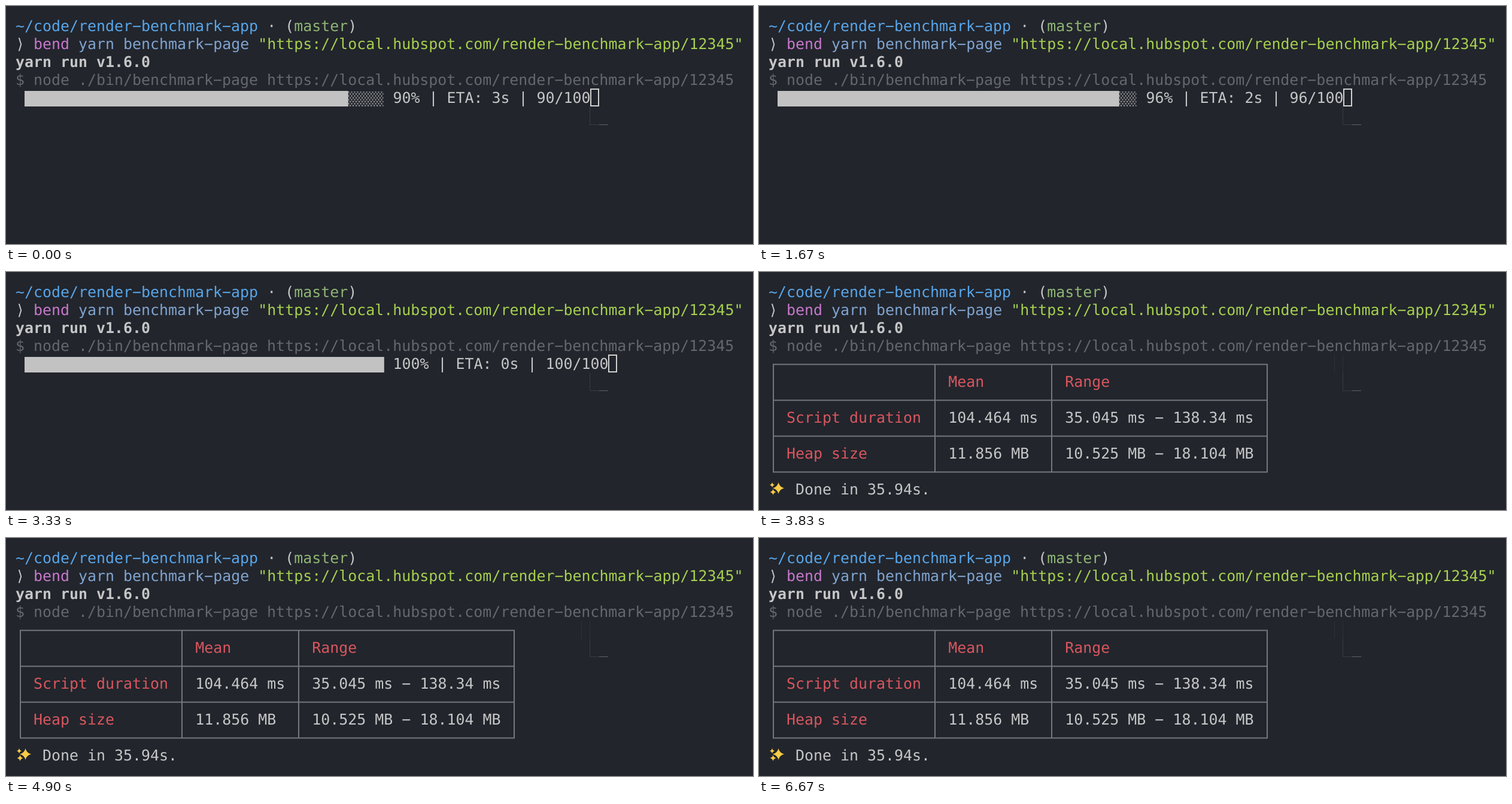
An HTML page for the animation above (6.71 s loop, 1248 by 398 pixels).

```html
<!DOCTYPE html>
<html lang="en">
<head>
<meta charset="utf-8">
<title>Benchmark terminal</title>
<style>
html, body { margin: 0; width: 100%; height: 100%; overflow: hidden; background: #22252c; }
svg { display: block; width: 1248px; height: 398px; }
text {
  font: 24.93px "DejaVu Sans Mono", "Liberation Mono", monospace;
  text-rendering: geometricPrecision;
  white-space: pre;
}
</style>
</head>
<body>
<svg id="stage" viewBox="0 0 1248 398">
  <defs>
    <pattern id="shade" x="31.3" y="142.5" width="5" height="6.5" patternUnits="userSpaceOnUse">
      <path d="M0.3 0.4h2v2h-2zM2.8 3.65h2v2h-2z" fill="#c2c2c2"/>
    </pattern>
  </defs>
  <rect width="1248" height="398" fill="#22252c"/>
  <g id="head"></g>
  <g id="trace" fill="none">
    <path id="smear" d="M961.5 139V168M975.5 139V168" stroke="#2d3037"/>
    <path d="M975.5 168V198.5H991" stroke="#383b42"/>
    <path d="M991 198.5H1006" stroke="#5f6268"/>
  </g>
  <g id="progress">
    <rect id="rest" y="143" height="25" fill="url(#shade)"/>
    <rect id="bar" x="31" y="142" height="26" fill="#c2c2c2"/>
    <text id="status" y="162" fill="#c5c6c6"></text>
    <rect id="cursor" y="139" width="13" height="28" fill="none" stroke="#d0d0d0" stroke-width="2"/>
  </g>
  <g id="report">
    <path id="grid" fill="none" stroke="#74777d" stroke-width="2"/>
    <path id="sparkles" fill="#f6cb45"/>
  </g>
</svg>
<script>
const LOOP = 6710, CELL = 15.01, LEFT = 16;
const STEP = 285, LEAD = 280, REPORT_AT = 3400;
const BAR_CELLS = 40;
const plain = "#c5c6c6", red = "#d9565f", dim = "#65676c";

const $ = id => document.getElementById(id);
const colX = col => LEFT + col * CELL;
const set = (el, attrs) => {
  for (const key in attrs) el.setAttribute(key, attrs[key]);
};
// The terminal face has wide hyphens.
const wide = s => s.replace(/-/g, "\u2212");

function write(group, row, col, content, fill, weight = 400) {
  const el = document.createElementNS("http://www.w3.org/2000/svg", "text");
  set(el, { x: colX(col), y: 42 + row * 30, fill });
  el.style.fontWeight = weight;
  el.textContent = wide(content);
  $(group).append(el);
}

const url = "https://local.hubspot.com/render-benchmark-app/12345";
write("head", 0, 0, "~/code/render-benchmark-app", "#58a6ea");
write("head", 0, 28, "· (", plain);
write("head", 0, 31, "master", "#8fb573");
write("head", 0, 37, ")", plain);
write("head", 1, 0, "⟩", plain);
write("head", 1, 2, "bend", "#c878cc");
write("head", 1, 7, "yarn benchmark-page", "#80a4d0");
write("head", 1, 27, `"${url}"`, "#a6d04e");
write("head", 2, 0, "yarn run v1.6.0", plain, 700);
write("head", 3, 0, "$ node ./bin/benchmark-page " + url, dim);

const cells = [
  ["", "Mean", "Range"],
  ["Script duration", "104.464 ms", "35.045 ms - 138.34 ms"],
  ["Heap size", "11.856 MB", "10.525 MB - 18.104 MB"]
];
cells.forEach((line, r) => line.forEach((content, c) =>
  write("report", 5 + 2 * r, [2, 20, 33][c], content, r && c ? plain : red)));
write("report", 11, 3, "Done in 35.94s.", plain);

const rules = [0, 1, 2, 3].map(i => `M23 ${154.5 + 60 * i}H850`);
const posts = [0, 18, 31, 55].map(c => `M${Math.round(colX(c + 0.5))} 154.5V334.5`);
set($("grid"), { d: rules.concat(posts).join("") });

function star(x, y, r) {
  const k = r * 0.2;
  return `M${x} ${y - r}Q${x + k} ${y - k} ${x + r} ${y}Q${x + k} ${y + k} ${x} ${y + r}` +
    `Q${x - k} ${y + k} ${x - r} ${y}Q${x - k} ${y - k} ${x} ${y - r}Z`;
}
set($("sparkles"), { d: star(32.5, 361.5, 9.5) + star(22, 356, 4) + star(23.5, 368, 5) });

const show = (id, on) => { $(id).style.display = on ? "" : "none"; };

function draw(t) {
  const done = t >= REPORT_AT;
  show("progress", !done);
  show("report", done);
  show("smear", done);
  if (done) return;

  const n = Math.min(100, 90 + Math.floor((t + LEAD) / STEP));
  const filled = Math.round(BAR_CELLS * n / 100);
  const end = colX(1 + filled);
  const eta = Math.ceil((100 - n) * 0.29);
  const status = `${n}% | ETA: ${eta}s | ${n}/100`;
  const statusCol = BAR_CELLS + 2;
  set($("bar"), { width: end - 31 + 0.4 });
  set($("rest"), { x: end, width: Math.max(0, 630.5 - end) });
  set($("status"), { x: colX(statusCol) });
  $("status").textContent = status;
  set($("cursor"), { x: Math.round(colX(statusCol + status.length)) });
}

const start = performance.now();
function tick() {
  draw((performance.now() - start) % LOOP);
  requestAnimationFrame(tick);
}
draw(0);
requestAnimationFrame(tick);
</script>
</body>
</html>
```
